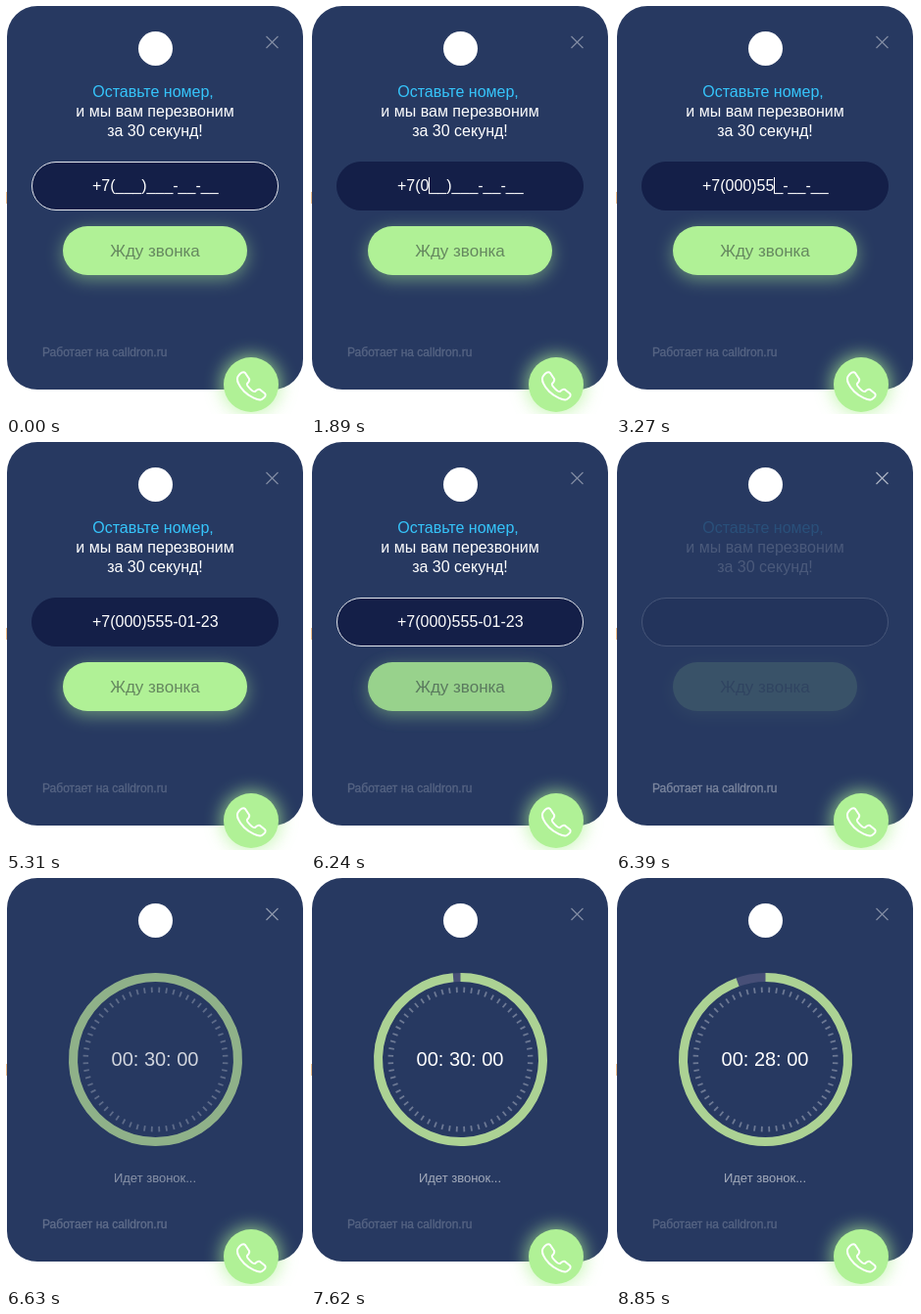
Animation of 305x417 px, one loop 8880 ms. Source, as an HTML page:

```html
<!DOCTYPE html>
<html lang="ru">
<head>
<meta charset="utf-8">
<style>
  html, body { margin: 0; width: 100%; height: 100%; overflow: hidden; background: #fff; }
  svg { display: block; width: 305px; height: 417px; font-family: "Liberation Sans", Arial, sans-serif; }
  text { white-space: pre; }
  .mid { text-anchor: middle; }
</style>
</head>
<body>
<svg viewBox="0 0 305 417">
  <defs>
    <filter id="soft" x="-60%" y="-80%" width="220%" height="260%">
      <feGaussianBlur stdDeviation="9"/>
    </filter>
  </defs>

  <rect y="190" width="1" height="12" fill="#f0c08c"/>
  <rect x="1" width="302" height="392" rx="31" fill="#273961"/>
  <circle cx="152.5" cy="43.5" r="17.5" fill="#fff"/>
  <path id="close" d="M265.5 31l12 12m0-12l-12 12" stroke="#fff" stroke-width="1.2" fill="none"/>

  <g id="form">
    <g class="mid" font-size="16" fill="#fff">
      <text x="150" y="93" fill="#36c5fb">Оставьте номер,</text>
      <text x="152" y="113">и мы вам перезвоним</text>
      <text x="152" y="133">за 30 секунд!</text>
    </g>
    <rect id="field" x="26.5" y="159.5" width="251" height="49" rx="24.5" fill="#141f48"/>
    <text id="phone" x="88" y="189" font-size="16" fill="#fff"></text>
    <rect id="caret" y="175" width="1" height="17" fill="#fff"/>
    <g id="button">
      <rect x="58" y="229" width="188" height="50" rx="25" fill="#b0f196" opacity=".5" filter="url(#soft)"/>
      <rect x="58" y="225" width="188" height="50" rx="25" fill="#b0f196"/>
      <text class="mid" x="152" y="256" font-size="17" fill="#65885f">Жду звонка</text>
    </g>
  </g>

  <g id="call">
    <circle cx="152.5" cy="185.5" r="84" fill="none" stroke="#474f77" stroke-width="9"/>
    <path id="ring" fill="none" stroke="#acd294" stroke-width="9"/>
    <path id="ticks" stroke="#fff" stroke-opacity=".32" stroke-width="1.8"/>
    <text id="timer" class="mid" x="152" y="192" font-size="20" fill="#fff"></text>
    <text class="mid" x="152" y="311" font-size="13" fill="#a3abbb">Идет звонок...</text>
  </g>

  <text id="footer" x="37" y="358" font-size="12" fill="#fff" stroke="#fff" stroke-width=".3">Работает на calldron.ru</text>

  <circle cx="250" cy="387" r="30" fill="#b0f196" opacity=".75" filter="url(#soft)"/>
  <circle cx="250" cy="387" r="28" fill="#b0f196"/>
  <path d="M237 378C239 375 242 373 244 375L248 381C249 383 248 384 246 386C245 388 252 395 254 394C256 392 257 391 259 392L264 396C266 398 264 400 261 402C258 404 248 399 243 394C238 389 234 382 237 378Z"
        fill="none" stroke="#fff" stroke-width="2" stroke-linejoin="round"/>
</svg>
<script>
const LOOP = 8880;
const MASK = '+7(___)___-__-__';
const NUMBER = '+7(000)555-01-23';
const KEYS = [1890, 2130, 2430, 3060, 3270, 3510, 3960, 4230, 4500, 4800];
const SLOTS = [...MASK].flatMap((c, i) => c === '_' ? [i] : []);
const CARET_OFF = [[870, 1380], [2940, 3060], [5310, LOOP]];
const CX = 152.5, CY = 185.5;

const el = {};
document.querySelectorAll('[id]').forEach(n => el[n.id] = n);
const set = (name, attrs) => {
  for (const k in attrs) el[name].setAttribute(k, attrs[k]);
};
const ramp = (t, a, b) => Math.min(1, Math.max(0, (t - a) / (b - a)));
const polar = (deg, r) => {
  const a = deg * Math.PI / 180;
  return (CX + r * Math.sin(a)).toFixed(2) + ' ' + (CY - r * Math.cos(a)).toFixed(2);
};

set('ticks', {
  d: Array.from({ length: 60 }, (_, i) => `M${polar(i * 6 + 3, 68.5)}L${polar(i * 6 + 3, 74)}`).join('')
});

// Advance widths of the glyphs before the caret, in em
const advance = s => [...s].reduce((w, c) => w + (c === '+' ? .584 : '()-'.includes(c) ? .333 : .556), 0);

function drawForm(t) {
  const typed = KEYS.filter(k => t >= k).length;
  const cut = typed < SLOTS.length ? SLOTS[typed] : MASK.length;
  const focus = t >= 300 && t < 5520;
  const caretOn = focus && !CARET_OFF.some(([a, b]) => t >= a && t < b);
  const fade = 1 - ramp(t, 6240, 6420);

  el.phone.textContent = NUMBER.slice(0, cut) + MASK.slice(cut);
  set('phone', { opacity: 1 - ramp(t, 6240, 6360) });
  set('caret', {
    x: Math.floor(88 + advance(NUMBER.slice(0, cut)) * 16),
    opacity: caretOn ? 1 : 0
  });
  set('field', { stroke: focus ? '#141f48' : '#e4e7ee' });
  set('button', { opacity: 1 - .16 * ramp(t, 5520, 6000) });
  set('form', { opacity: fade });
}

function drawCall(t) {
  const show = 1 - (1 - ramp(t, 6420, 6810)) ** 2;
  const spent = Math.max(0, t - 7200) / 1000;
  const end = 359.99 - spent * 12;
  set('call', { opacity: show });
  set('ring', { d: `M${polar(0, 84)}A84 84 0 1 1 ${polar(end, 84)}` });
  el.timer.textContent = `00: ${Math.round(30 - spent)}: 00`;
}

function draw(t) {
  drawForm(t);
  drawCall(t);
  const flash = ramp(t, 6240, 6390) * (1 - ramp(t, 6420, 6720));
  set('footer', { opacity: .21 + .18 * flash });
  set('close', { opacity: .42 + .2 * flash });
}

const start = performance.now();
function frame() {
  draw((performance.now() - start) % LOOP);
  requestAnimationFrame(frame);
}
frame();
</script>
</body>
</html>
```
